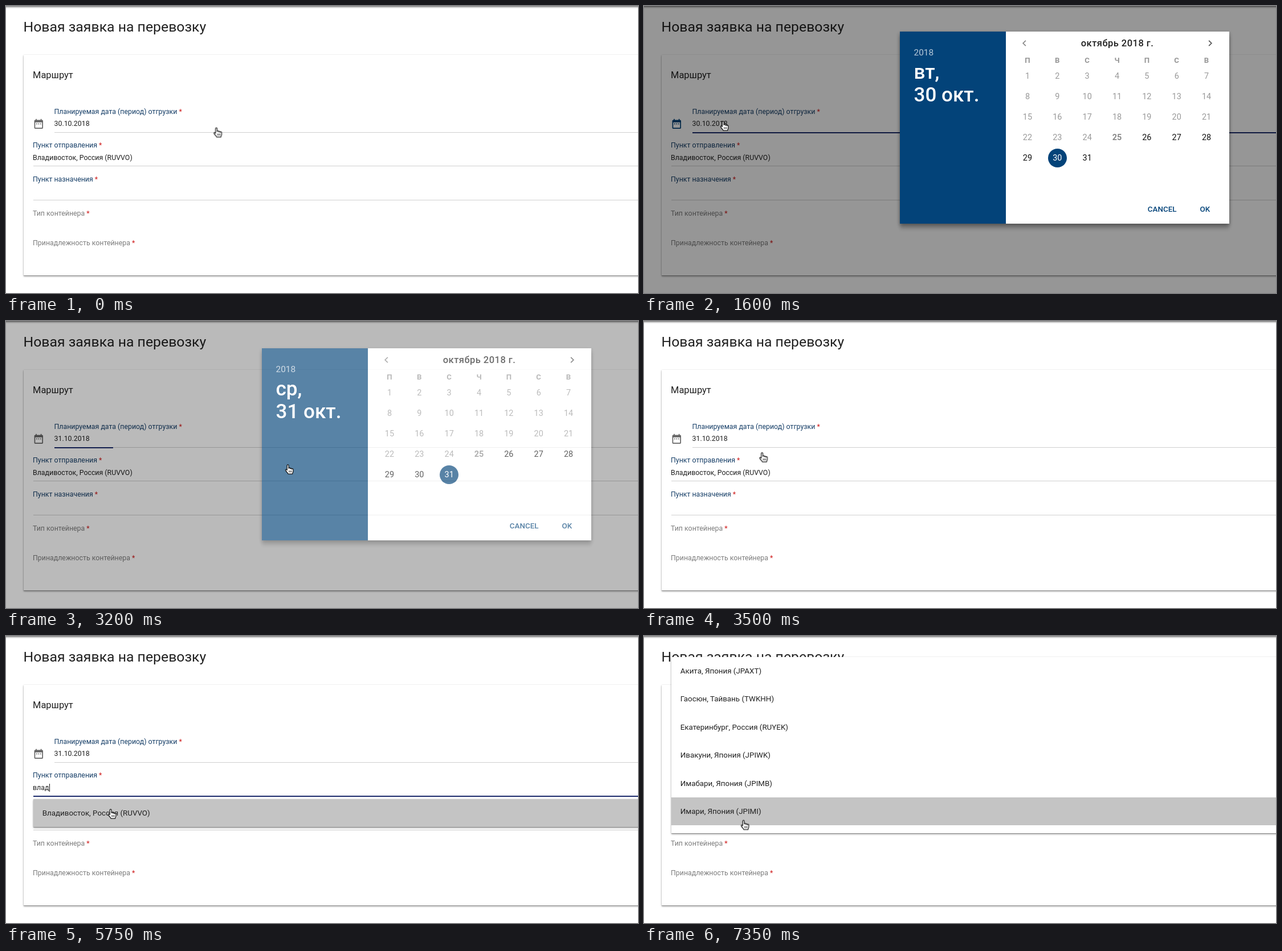
An HTML page that plays this animation: 1109 by 505 pixels, repeating every 8 s.

```html
<!DOCTYPE html>
<html lang="ru">
<head>
<meta charset="utf-8">
<title>Новая заявка</title>
<style>
  :root { --blue: #034379; --navy: #1b2a6b; --ink: #212121; }
  html, body { margin: 0; width: 100%; height: 100%; overflow: hidden; background: #fff; }
  body { position: relative; font: 12.36px/20px Roboto, sans-serif; color: var(--ink); }
  body * { box-sizing: border-box; }
  div, svg, h1, h2 { position: absolute; margin: 0; white-space: nowrap; }
  .anim { animation: 8s step-end infinite; }
  .smooth { animation: 8s linear infinite; }

  /* Page */
  .bar { left: -9px; right: -9px; top: -4px; height: 5px; background: #8c8c8c; box-shadow: 0 1px 3px rgba(0,0,0,.5); }
  .card, .panel { background: #fff; box-shadow: 0 2px 3px rgba(0,0,0,.28), 0 1px 1px rgba(0,0,0,.25), 0 0 2px rgba(0,0,0,.12); }
  .card { left: 31px; top: 86px; width: 1400px; height: 388px; }
  .text { left: 47px; top: calc(var(--y) * 1px - 10px); }
  .indent { left: 84.5px; }
  h1 { font-size: 24.8px; font-weight: 400; }
  h2 { font-size: 16.48px; font-weight: 400; }
  .label { color: #173f68; }
  .label.off { color: #7d7d7d; }
  .label em { font-style: normal; color: #d01f1f; }
  .line { left: 47.5px; top: calc(var(--y) * 1px); width: 1364px; height: 1px; background: #d0d0d0; }
  .focus { height: 2px; background: var(--navy); transform: scaleX(0); transform-origin: 0 0; }
  .line.indent { left: 84.5px; width: 1327px; }
  .icon { left: 47.2px; top: 196.7px; width: 20.6px; height: 20.6px; fill: #666; }
  .typed b { font-weight: 400; animation: letter 8s step-end infinite; }
  .caret { display: inline-block; width: 1px; height: 14px; margin-left: 1px; background: #111; vertical-align: -3px; }

  /* Drop-downs */
  .panel { left: 47.5px; top: 287px; width: 1364px; overflow: hidden; font-size: 13.39px; opacity: 0; }
  .wait { height: 78px; }
  .wait svg { left: 665px; top: 21px; width: 34px; height: 34px; fill: none; stroke: #f0963a; stroke-width: 3; animation: spin 1s linear infinite; }
  .list { height: 309.5px; }
  .list p { margin: 0; padding-left: 16.2px; line-height: 49.4px; }
  .hot { background: #c4c4c4; }

  /* Date dialog */
  .layer { inset: 0; opacity: 0; }
  .shade { inset: 0; background: rgba(0,0,0,.41); }
  .dialog { left: 449px; top: 62px; width: 577.5px; height: 338px; background: #fff; box-shadow: 0 10px 6px rgba(0,0,0,.14), 0 3px 7px rgba(0,0,0,.4); }
  .side { width: 186px; height: 338px; background: var(--blue); color: #fff; }
  .side div { left: 24.5px; font-weight: 500; font-size: 35px; line-height: 40px; top: 51.5px; }
  .side .year { top: 27px; font-size: 15.45px; font-weight: 400; line-height: 20px; color: rgba(255,255,255,.72); }
  .month { left: 186px; width: 391px; top: 10.5px; text-align: center; font-size: 16.48px; font-weight: 500; letter-spacing: .5px; }
  .chevron { top: 10px; width: 21px; height: 21px; fill: none; stroke: #555; stroke-width: 2; }
  .grid { left: 197.8px; display: grid; grid-template-columns: repeat(7, 52.35px); text-align: center; font-size: 14.42px; }
  .week { top: 41px; font-size: 13.2px; font-weight: 700; color: #969696; }
  .days { top: 60.7px; line-height: 36.1px; color: #111; }
  .past { color: #999; }
  .today { color: #888; font-weight: 700; }
  .days i { display: inline-block; width: 33px; line-height: 33px; border-radius: 50%; font-style: normal; }
  .action { top: 303px; font-size: 13.39px; font-weight: 500; color: var(--blue); }

  .cursor { left: -8px; top: -9px; width: 16px; height: 18px; overflow: visible; }

  @keyframes cursor {
    0%, .6% { transform: translate(371.5px, 222.5px); }
    3.1%, 21.3% { transform: translate(141px, 211px); animation-timing-function: ease-in-out; }
    31%, 37.5% { transform: translate(769.5px, 291.5px); }
    40%, 40.6% { transform: translate(497px, 261px); animation-timing-function: ease-out; }
    45%, 68.7% { transform: translate(172px, 237px); }
    71.5%, 79.5% { transform: translate(186px, 313px); }
    83.5%, 100% { transform: translate(177px, 332.5px); }
  }
  @keyframes pointer { 0% { opacity: 1 } 52% { opacity: 0 } 65% { opacity: 1 } }

  @keyframes dateLine {
    0%, 12.5% { transform: scaleX(0); }
    17.5%, 38.1% { transform: scaleX(1); }
    40%, 40.6% { transform: scaleX(.0776); }
    41.2%, 100% { transform: scaleX(0); }
  }
  @keyframes fromLine {
    0%, 46% { transform: scaleX(0); }
    50%, 72.5% { transform: scaleX(1); }
    75.5%, 100% { transform: scaleX(0); }
  }
  @keyframes toLine { 0%, 77.5% { transform: scaleX(0) } 81%, 100% { transform: scaleX(1) } }
  @keyframes icon { 0% { fill: #666 } 13% { fill: var(--blue) } 39.4% { fill: #666 } }

  @keyframes layer {
    0%, 19.99% { opacity: 0; }
    20%, 38.75% { opacity: 1; }
    40%, 40.6% { opacity: .66; }
    42.5%, 100% { opacity: 0; }
  }
  @keyframes dialog {
    0%, 20.6% { transform: translateY(-17px); animation-timing-function: cubic-bezier(.23,1,.32,1); }
    25%, 38.75% { transform: none; }
    40%, 40.6% { transform: translateY(-14px); }
    42.5%, 100% { transform: translateY(-42px); }
  }
  @keyframes oldDay { 0% { background: #034379; color: #fff } 37.6% { background: transparent; color: #111 } }
  @keyframes newDay { 0% { background: transparent; color: #111 } 31% { background: #034379; color: #fff } }
  @keyframes oldHead { 0% { opacity: 1 } 37.6% { opacity: 0 } }
  @keyframes newHead { 0% { opacity: 0 } 37.6% { opacity: 1 } }
  @keyframes oldDate { 0% { opacity: 1 } 38.5% { opacity: 0 } }
  @keyframes newDate { 0% { opacity: 0 } 38.5% { opacity: 1 } }

  @keyframes city { 0% { opacity: 1 } 46.5% { opacity: 0 } 72.5% { opacity: 1 } }
  @keyframes typed { 0% { opacity: 0 } 46.5% { opacity: 1 } 72.5% { opacity: 0 } }
  @keyframes letter { 0% { font-size: 0 } 55% { font-size: 12.36px } 74% { font-size: 0 } }
  @keyframes caret { 0% { opacity: 1 } 62.5% { opacity: 0 } 68.75% { opacity: 1 } }

  @keyframes fromWait { 0% { opacity: 0 } 47.5% { opacity: 1 } 51.5% { opacity: 0 } 57.5% { opacity: 1 } 61.85% { opacity: 0 } }
  @keyframes fromList { 0% { opacity: 0 } 51.5% { opacity: 1 } 57.5% { opacity: 0 } }
  @keyframes found { 0% { opacity: 0 } 61.85% { opacity: 1 } 72.5% { opacity: 0 } }
  @keyframes hover { 0% { background: #fff } 70.5% { background: #c4c4c4 } }
  @keyframes toWait { 0% { opacity: 0 } 77.5% { opacity: 1 } 79.4% { opacity: 0 } }
  @keyframes toList { 0%, 79.4% { opacity: 0 } 81%, 100% { opacity: 1 } }
  @keyframes spin { from { transform: rotate(163deg) } to { transform: rotate(523deg) } }
</style>
</head>
<body>
  <div class="bar"></div>
  <h1 class="text" style="--y:37;left:30.5px">Новая заявка на перевозку</h1>
  <div class="card"></div>
  <h2 class="text" style="--y:122">Маршрут</h2>

  <svg class="icon anim" style="animation-name:icon" viewBox="0 0 24 24"><path d="M9 11H7v2h2zm4 0h-2v2h2zm4 0h-2v2h2zm2-7h-1V2h-2v2H8V2H6v2H5a2 2 0 0 0-2 2v14a2 2 0 0 0 2 2h14a2 2 0 0 0 2-2V6a2 2 0 0 0-2-2zm0 16H5V9h14z"/></svg>
  <div class="text label indent" style="--y:185.5">Планируемая дата (период) отгрузки <em>*</em></div>
  <div class="text indent anim" style="--y:207;animation-name:oldDate">30.10.2018</div>
  <div class="text indent anim" style="--y:207;animation-name:newDate">31.10.2018</div>
  <div class="line indent" style="--y:221.5"></div>
  <div class="line indent focus smooth" style="--y:221.5;animation-name:dateLine"></div>

  <div class="text label" style="--y:245">Пункт отправления <em>*</em></div>
  <div class="text anim" style="--y:267;animation-name:city">Владивосток, Россия (RUVVO)</div>
  <div class="text typed anim" style="--y:267;animation-name:typed"><b>в</b><b style="animation-delay:.1s">л</b><b style="animation-delay:.2s">а</b><b style="animation-delay:.3s">д</b><span class="caret anim" style="animation-name:caret"></span></div>
  <div class="line" style="--y:281"></div>
  <div class="line focus smooth" style="--y:281;animation-name:fromLine"></div>

  <div class="text label" style="--y:305">Пункт назначения <em>*</em></div>
  <div class="line" style="--y:341"></div>
  <div class="line focus smooth" style="--y:341;animation-name:toLine"></div>

  <div class="text label off" style="--y:365">Тип контейнера <em>*</em></div>
  <div class="text label off" style="--y:416.5">Принадлежность контейнера <em>*</em></div>

  <div class="panel wait anim" style="animation-name:fromWait"></div>
  <div class="panel list anim" style="animation-name:fromList"></div>
  <div class="panel anim" style="animation-name:found">
    <p class="anim" style="margin:0;padding-left:16.2px;line-height:49.4px;animation-name:hover">Владивосток, Россия (RUVVO)</p>
  </div>
  <div class="panel wait anim" style="top:347px;animation-name:toWait"></div>
  <div class="panel list smooth" id="ports" style="top:37px;animation-name:toList"></div>

  <div class="layer smooth" style="animation-name:layer">
    <div class="shade"></div>
    <div class="dialog smooth" style="animation-name:dialog">
      <div class="side">
        <div class="year">2018</div>
        <div class="anim" style="animation-name:oldHead">вт,<br>30 окт.</div>
        <div class="anim" style="animation-name:newHead">ср,<br>31 окт.</div>
      </div>
      <svg class="chevron" style="left:208px;stroke:#888" viewBox="0 0 24 24"><path d="M14.7 6.7 9.4 12l5.3 5.3"/></svg>
      <div class="month">октябрь 2018 г.</div>
      <svg class="chevron" style="left:533.5px" viewBox="0 0 24 24"><path d="M9.3 6.7 14.6 12l-5.3 5.3"/></svg>
      <div class="grid week"></div>
      <div class="grid days"></div>
      <div class="action" style="left:434.8px">CANCEL</div>
      <div class="action" style="left:526.5px">OK</div>
    </div>
  </div>

  <div class="smooth" style="left:0;top:0;animation-name:cursor">
    <svg class="cursor anim" style="animation-name:pointer" viewBox="0 0 16 18" fill="#fff" stroke="#111" stroke-width="1.2" stroke-linejoin="round">
      <path d="M4.2 10.6V2.3a1.4 1.4 0 0 1 2.8 0v5a1.3 1.2 0 0 1 2.7.3v.5a1.3 1.2 0 0 1 2.6.3v.6a1.25 1.2 0 0 1 2.6.4v3.3c0 1.8-1.3 2.5-1.3 4.5H6.1c0-1.7-2.8-3.3-4.4-6.1-.9-1.6.7-2.7 1.8-1.5z"/>
      <path d="M7.8 11.2v3.2M9.9 11.2v3.2M12 11.2v3.2" stroke-width=".9"/>
    </svg>
  </div>

<script>
  const fill = (selector, html) =>
    document.querySelectorAll(selector).forEach(node => { node.innerHTML = html; });

  const ports = ['Акита, Япония (JPAXT)', 'Гаосюн, Тайвань (TWKHH)', 'Екатеринбург, Россия (RUYEK)',
    'Ивакуни, Япония (JPIWK)', 'Имабари, Япония (JPIMB)', 'Имари, Япония (JPIMI)'];
  fill('.list', ports.map(port => `<p>${port}</p>`).join(''));
  document.querySelector('#ports p:last-child').className = 'hot';

  fill('.wait', '<svg viewBox="0 0 34 34"><circle cx="17" cy="17" r="15.2" pathLength="360" stroke-dasharray="282 78"/></svg>');
  fill('.week', [...'ПВСЧПСВ'].map(day => `<span>${day}</span>`).join(''));

  const picked = { 30: 'oldDay', 31: 'newDay' };
  const dayCell = day => {
    const tone = day < 25 ? 'past' : day === 25 ? 'today' : '';
    const text = picked[day] ? `<i class="anim" style="animation-name:${picked[day]}">${day}</i>` : day;
    return `<span class="${tone}">${text}</span>`;
  };
  fill('.days', Array.from({ length: 31 }, (_, i) => dayCell(i + 1)).join(''));
</script>
</body>
</html>
```
